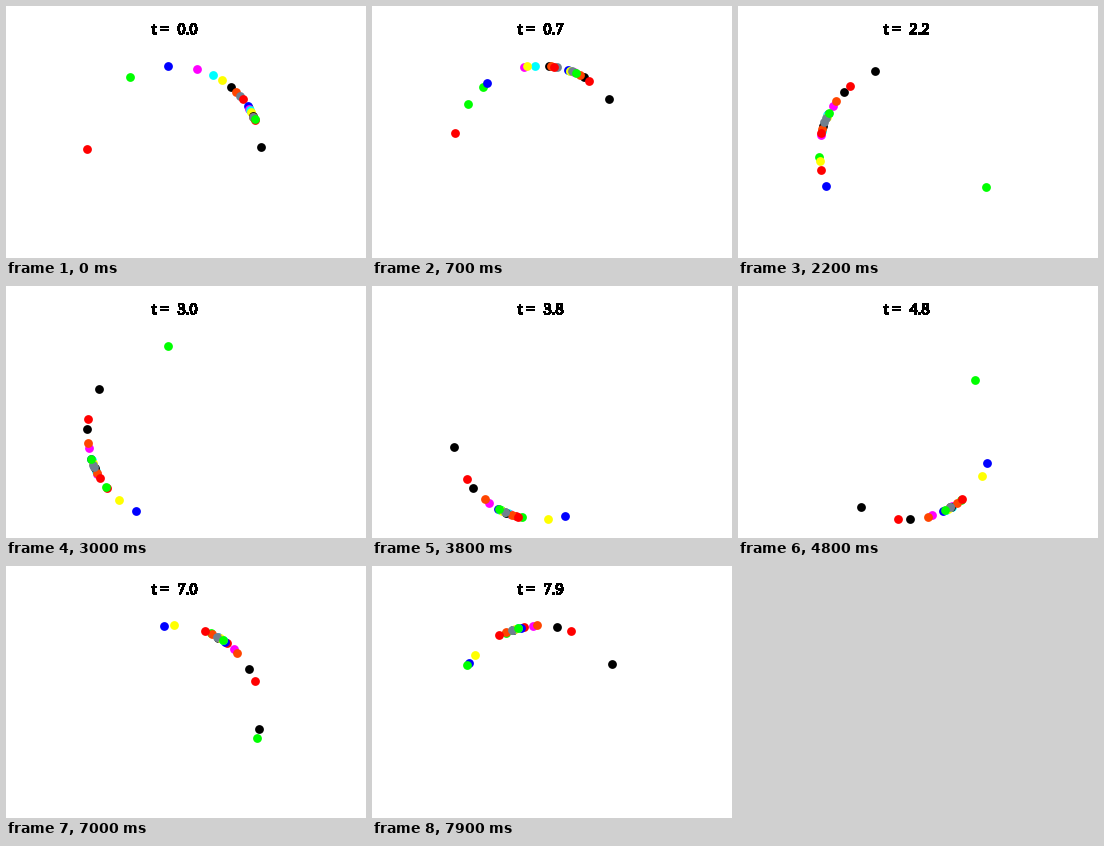
Animation, 360 px wide and 252 px high, one loop 8000 ms. Source, as a matplotlib script:

```python
import numpy as np
import matplotlib.pyplot as plt
from matplotlib.animation import FuncAnimation
from matplotlib.patheffects import withStroke

W, H, DPI = 360, 252, 100
PX = 72 / DPI
FRAMES, STEP = 80, 0.1
CX, CY, R = 168.1, 146.4, 87
SPIN = 54    # common rotation, degrees per second
AGE = 0.08   # seconds already run when the clock shows zero

PALETTE = ["#ff0000", "#00ff00", "#0000ff", "#ff00ff", "#00ffff",
           "#ffff00", "#000000", "#ff4500", "#708090"]
FAST = 10    # the oscillator too quick to lock to the others

# Final phase lead of each oscillator over the common rotation, in degrees
SETTLED = np.array([28, 42, 74, 37, 37, 68, 37, 42, 37, 47, 0,
                    32, 24, 34, 36, 7, 21, 38, -4, 34, -99])
COUNT = len(SETTLED)
START = 360 / np.arange(2, COUNT + 2)
START[-1] = 0
# The further from the crowd, the weaker the pull
RATE = 0.65 / (1 + ((SETTLED - 44) / 45) ** 2)


def drift(t):
    """Lead of the fast oscillator: it hurries and lingers once per lap."""
    a, q = np.radians(23 + 96.2 * t), 0.179
    return np.degrees(a + 2 * np.arctan2(q * np.sin(a), 1 - q * np.cos(a))) - 2


def angles(t):
    age = t + AGE
    a = SPIN * age + SETTLED + (START - SETTLED) * np.exp(-RATE * age)
    a[FAST] = SPIN * t + drift(t)
    return np.radians(a)


fig = plt.figure(figsize=(W / DPI, H / DPI), dpi=DPI, facecolor="white")
ax = fig.add_axes([0, 0, 1, 1])
ax.set(xlim=(0, W), ylim=(H, 0))
ax.axis("off")

colors = [PALETTE[k % len(PALETTE)] for k in range(COUNT - 1)] + ["#000000"]
dots = [ax.plot([], [], "o", color=c, ms=8.8 * PX, mew=0,
                antialiased=False, zorder=2 + k)[0]
        for k, c in enumerate(colors)]
label = ax.text(146, 28, "", family="Liberation Serif", size=16 * PX,
                color="black", va="baseline", antialiased=False,
                path_effects=[withStroke(linewidth=0.4, foreground="black")])


def update(n):
    t = n * STEP
    for dot, a in zip(dots, angles(t)):
        dot.set_data([CX + R * np.cos(a)], [CY - R * np.sin(a)])
    label.set_text(f"t =  {t:.1f}")
    return [*dots, label]


anim = FuncAnimation(fig, update, frames=FRAMES, interval=100,
                     repeat=True, repeat_delay=0, blit=False)
plt.show()
```
